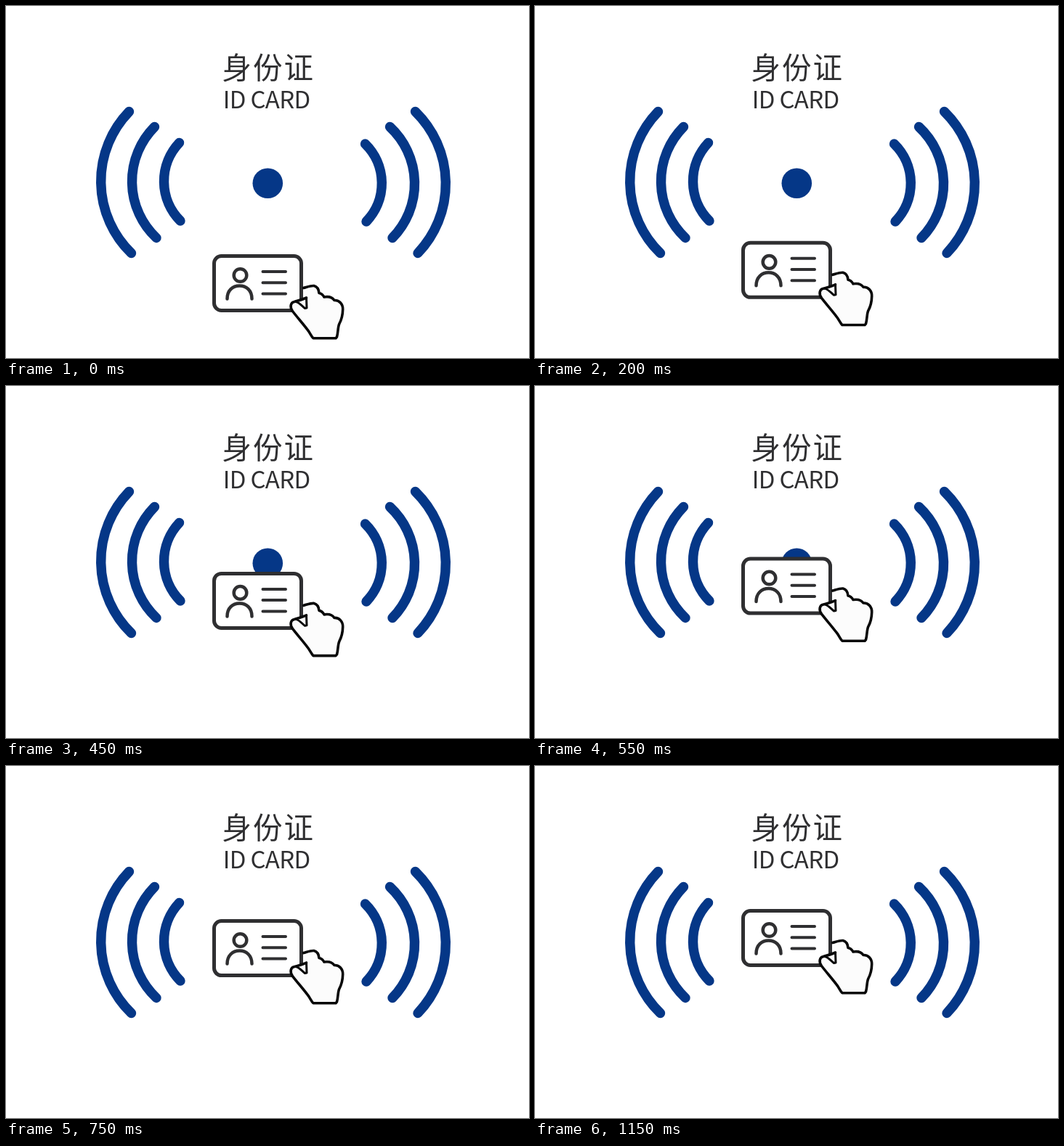
An HTML page with a canvas for the animation above (1.85 s loop, 720x485 px).

```html
<!DOCTYPE html>
<html lang="zh-CN">
<head>
<meta charset="utf-8">
<title>ID card</title>
<style>
  html, body { margin: 0; width: 100%; height: 100%; overflow: hidden; background: #fff; }
  canvas { display: block; width: 720px; height: 485px; }
</style>
</head>
<body>
<canvas id="stage" width="720" height="485"></canvas>
<script>
const ctx = document.getElementById('stage').getContext('2d');
const LOOP = 1850, SLIDE = 1150, STEP = 50, RISE = 145;
const BLUE = '#053787', INK = '#2f2f31', OUTLINE = '#080808';
const FONT = '"Noto Sans CJK SC", "Noto Sans CJK", sans-serif';

// Wave from top to bottom point, bulging out to the given x
function wave(x1, y1, x2, y2, edge) {
  const half = Math.hypot(x2 - x1, y2 - y1) / 2;
  const sag = Math.abs((x1 + x2) / 2 - edge);
  const r = (half * half + sag * sag) / (2 * sag);
  return new Path2D(`M${x1} ${y1} A${r} ${r} 0 0 ${edge > x1 ? 1 : 0} ${x2} ${y2}`);
}

const waves = [
  wave(169.5, 145.5, 172.5, 340.5, 130.7),
  wave(204.5, 166.5, 207, 319.5, 173.5),
  wave(238.5, 188.5, 240, 296, 217.5),
  wave(494.5, 190, 496, 297, 517.3),
  wave(528.5, 166.5, 532, 319.5, 562.5),
  wave(563.5, 145.5, 567, 340.5, 605.3)
];

const frame = new Path2D();
frame.roundRect(286.5, 344.5, 120, 75, 10);

const person = new Path2D('M304.5 403.5 C304.5 392 312 385.5 321.5 385.5 S338.5 392 338.5 403.5');
const head = new Path2D();
head.arc(322.5, 371, 8.8, 0, 7);

const lines = new Path2D('M353.5 366 H385 M353.5 381.2 H385 M353.5 396.5 H385');

const hand = new Path2D(
  'M409.5 388.5 C415 387 420 385 424 385.5 C428 386.5 430.5 390 431 395.5 ' +
  'C434 396 436 397.5 438 401 C444 400 449 401 452 405.5 ' +
  'C459 405 464 411 463.7 418 C463.5 426 462 432 459 437.5 ' +
  'C456.5 443 457.5 449 455.5 456 L454 457.7 H423 ' +
  'C420 455 418.5 450 415 446 C409.5 438.5 401 429 394.5 420.5 ' +
  'C390.5 415 391.5 408.5 397 407.5 C402 406 408 404.5 413.5 402');
const thumb = new Path2D('M399 407.5 C404 408.5 407 413 411.5 416.5 L414 416 L413.5 402');

// cubic-bezier(.333, 0, .254, 1)
function ease(x) {
  let lo = 0, hi = 1;
  for (let i = 0; i < 30; i++) {
    const s = (lo + hi) / 2, u = 1 - s;
    const bx = 3 * u * u * s * 0.333 + 3 * u * s * s * 0.254 + s * s * s;
    if (bx < x) lo = s; else hi = s;
  }
  return lo * lo * (3 - 2 * lo);
}

function stroke(path, width, color) {
  ctx.lineWidth = width;
  ctx.strokeStyle = color;
  ctx.stroke(path);
}

function fill(path, color) {
  ctx.fillStyle = color;
  ctx.fill(path);
}

function label(text, x, y, size, spacing) {
  ctx.font = `${size}px ${FONT}`;
  ctx.letterSpacing = spacing + 'px';
  ctx.fillStyle = INK;
  ctx.fillText(text, x, y);
}

function drawCard() {
  fill(frame, '#fff');
  stroke(frame, 5, INK);
  stroke(head, 4.5, INK);
  stroke(person, 4.5, INK);
  stroke(lines, 4, INK);
  fill(hand, '#fcfcfc');
  stroke(hand, 3.6, OUTLINE);
  stroke(thumb, 3, OUTLINE);
}

function draw(t) {
  ctx.fillStyle = '#fff';
  ctx.fillRect(0, 0, 720, 485);
  ctx.lineCap = ctx.lineJoin = 'round';
  label('身份证', 297.5, 100.3, 40.5, 2);
  label('ID CARD', 298.8, 140.8, 33, -0.7);
  for (const w of waves) stroke(w, 13.4, BLUE);
  ctx.beginPath();
  ctx.arc(360.3, 244.3, 20.8, 0, 7);
  ctx.fillStyle = BLUE;
  ctx.fill();

  ctx.save();
  ctx.translate(0, -RISE * ease(Math.min(t / SLIDE, 1)));
  drawCard();
  ctx.restore();
}

const start = performance.now();
function tick() {
  const t = (performance.now() - start) % LOOP;
  draw(Math.floor(t / STEP) * STEP);
  requestAnimationFrame(tick);
}
tick();
</script>
</body>
</html>
```
